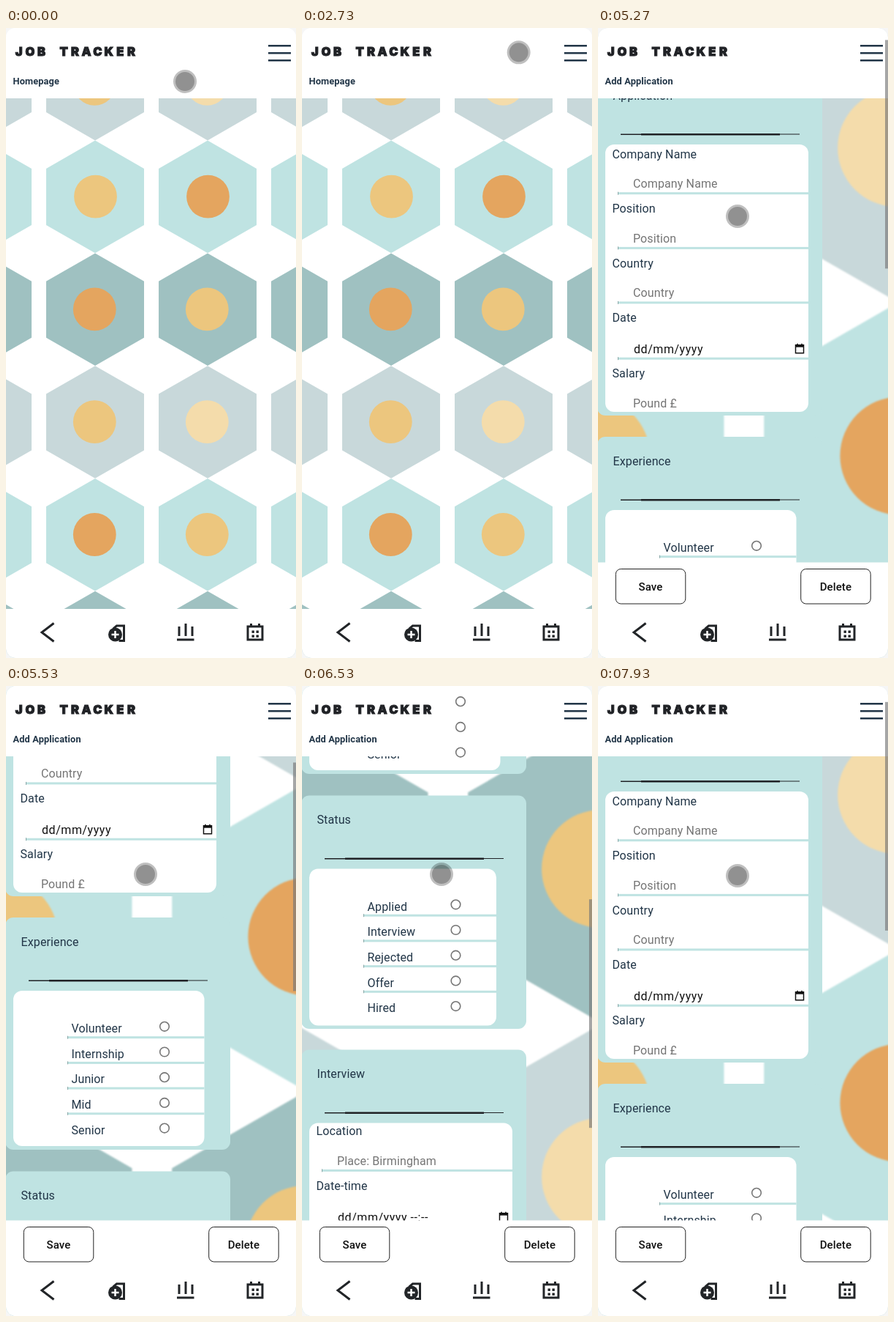
Recreate the animation shown at these times as an HTML page. Size 397 px wide and 860 px high, loop 8000 ms.

```html
<!DOCTYPE html>
<html lang="en">
<head>
<meta charset="utf-8">
<title>Job tracker</title>
<style>
  html, body { margin: 0; width: 100%; height: 100%; overflow: hidden; background: #f6f6f6; }
  svg { display: block; width: 397px; height: 860px; font: 16px Roboto, sans-serif; letter-spacing: .12px; fill: #213547; }
  .brand { font: 900 16.5px Inter, sans-serif; fill: #202226; stroke: #202226; stroke-width: 1; text-anchor: middle; letter-spacing: 0; }
  .crumb { font-size: 12.8px; font-weight: 600; }
  .item { font-weight: 500; fill: #212529; letter-spacing: .2px; }
  .hint { fill: #757575; }
  .date { fill: #111; letter-spacing: .55px; }
  .button { font-size: 15px; font-weight: 500; fill: #111; text-anchor: middle; }
  .line { fill: none; stroke: #213547; stroke-width: 2.5; }
  .icon { fill: none; stroke: #222528; stroke-width: 3; }
  .radio { fill: #fff; stroke: #767676; stroke-width: 1.6; }
</style>
</head>
<body>
<svg id="stage" viewBox="0 0 397 860"></svg>
<script>
const LIGHT = '#bfe3e2', DARK = '#9fc1c1', MIST = '#c8d8da';
const YELLOW = '#ecc67e', ORANGE = '#e4a55f', CREAM = '#f4dcab';
const TICK = 1000 / 15, LOOP = 120;

const rect = (x, y, w, h, fill, r = 0) =>
  `<rect x="${x}" y="${y}" width="${w}" height="${h}" rx="${r}" fill="${fill}"/>`;
const text = (x, mid, label, cls = '') =>
  `<text x="${x}" y="${mid + 5.7}" class="${cls}">${label}</text>`;
const path = (d, cls) => `<path d="${d}" class="${cls}"/>`;
const group = (id, body) => `<g id="${id}">${body}</g>`;
const rule = (x, y) => `<path d="M${x} ${y - .6}h28v-.4h190v.4h27v1.2h-27v.8h-190v-.4h-28z" fill="#202226"/>`;
const divider = (x, y, right) => rect(x, y - 1.5, right - x, 3, LIGHT) + rect(x, y - 2, 1, 4, '#86a5a5');

// Hexagon wallpaper
const rows = [
  [MIST, YELLOW, CREAM], [LIGHT, YELLOW, ORANGE], [DARK, ORANGE, YELLOW],
  [MIST, YELLOW, CREAM], [LIGHT, ORANGE, YELLOW], [DARK, YELLOW, ORANGE]
];
const wallpaper = rows.map(([hex, ...dots], i) => {
  const cy = 76.6 + i * 153.8;
  const cells = [-32, 122, 276, 430].map(cx =>
    `<path d="M${cx} ${cy - 76.8}l67 38.3v77l-67 38.3l-67-38.3v-77z" fill="${hex}"/>`).join('');
  const shift = i === 1 ? .5 : -.7;
  return cells + dots.map((c, j) =>
    `<circle cx="${122 + j * 154 + shift}" cy="${cy - .3}" r="29.4" fill="${c}"/>`).join('');
}).join('');

// Form cards, in page coordinates
const card = (top, height, title, boxRight, boxHeight) =>
  rect(-1, top, 308, height, LIGHT, 11) + text(20.5, top + 33, title) + rule(31, top + 86) +
  rect(10, top + 100, boxRight - 10, boxHeight, '#fff', 12);

const rowGap = 34.7;
const choices = (top, right, labels) => labels.map((label, i) =>
  text(89.5, top + 151.3 + i * rowGap, label) +
  (i < labels.length - 1 ? divider(84, top + 163.7 + i * rowGap, right) : '')).join('');
const radios = (top, x) => [0, 1, 2, 3, 4].map(i =>
  `<circle cx="${x}" cy="${top + 148.8 + i * rowGap}" r="6.3" class="radio"/>`).join('');

const calendarMark = y =>
  `<path d="M270.5 ${y - 5}h11v11h-11zM273 ${y - 7}v2M279 ${y - 7}v2" fill="none" stroke="#111" stroke-width="1.5"/>` +
  rect(270, y - 5.5, 12, 3.5, '#111');
const field = (top, label, hint, isDate, last) =>
  text(19.5, top, label) + text(isDate ? 49 : 48, top + (isDate ? 42.3 : 40.3), hint, isDate ? 'date' : 'hint') +
  (isDate ? calendarMark(top + 42) : '') + (last ? '' : divider(27, top + (isDate ? 55.5 : 53.7), 288));

const form =
  card(104, 470, 'Application', 288, 365) +
  field(217, 'Company Name', 'Company Name') +
  field(291.7, 'Position', 'Position') +
  field(366.2, 'Country', 'Country') +
  field(440.7, 'Date', 'dd/mm/yyyy', true) +
  field(516.7, 'Salary', 'Pound £', false, true) +
  card(603, 317, 'Experience', 271.5, 212) +
  choices(603, 271.5, ['Volunteer', 'Internship', 'Junior', 'Mid', 'Senior']) +
  card(949.5, 318.5, 'Status', 266, 214) +
  choices(949.5, 266, ['Applied', 'Interview', 'Rejected', 'Offer', 'Hired']) +
  card(1296.5, 470, 'Interview', 288, 365) +
  field(1407.7, 'Location', 'Place: Birmingham') +
  field(1482.7, 'Date-time', 'dd/mm/yyyy --:--', true);

const menuItems = [['Add application', 252.5], ['Recent application', 308.5], ['Calendar', 365.5], ['Statistics', 420.5], ['Archive', 477.5]];
const menu = rect(45, 96, 307.5, 595, LIGHT) + text(65.5, 129.5, 'Menu') + rule(76, 182) +
  rect(64.5, 229.5, 259, 355, '#fff', 12) +
  menuItems.map(([label, y], i) => text(120, y, label, 'item') + (i < 4 ? divider(120, y + 24, 323.5) : '')).join('');

const brandX = [...'JOB TRACKER'].map((_, i) => 17.6 + i * 15.4).join(' ');
const header = rect(0, 0, 397, 96, '#fff') +
  `<text x="${brandX}" y="37.7" class="brand">JOB TRACKER</text>` +
  group('homeCrumb', text(9.5, 71.3, 'Homepage', 'crumb')) +
  group('addCrumb', text(9.5, 71.3, 'Add Application', 'crumb')) +
  group('bars', path('M359 24.2h31M359 34.2h31M359 44.2h31', 'line')) +
  group('cross', path('M363.5 22.5l22.5 22.5M386 22.5l-22.5 22.5', 'line'));

const button = (x, label) =>
  `<rect x="${x}" y="738.5" width="95.5" height="47.5" rx="7" fill="#fff" stroke="#222"/>` +
  text(x + 47.7, 762.3, label, 'button');
const dots = [337.5, 343.5].map(x => [822.5, 828.5].map(y => rect(x - 1, y, 3.4, 3.4, '#222528')).join('')).join('');
const nav = rect(0, 793, 397, 67, '#fff') +
  path('M65.5 812.5L49 825l16.500 12.500', 'icon') +
  path('M147.500 822v-2.500l4-3.500h10v20.500h-7', 'icon') +
  '<circle cx="149.500" cy="828" r="9.5" fill="#222528"/>' +
  '<path d="M149.500 823v10M144.500 828h10" stroke="#fff" stroke-width="2.5"/>' +
  path('M237 817v13M246 813v17M255 817v13M234 835h23.500', 'icon') +
  path('M331 817h20v18h-20zM335.500 813v5M346.500 813v5', 'icon') + dots;

const stage = document.getElementById('stage');
stage.innerHTML =
  '<clipPath id="screen"><rect width="397" height="860" rx="13"/></clipPath><g clip-path="url(#screen)">' +
  rect(0, 0, 397, 860, '#fff') +
  group('paper', wallpaper) + group('form', form) + group('menu', menu) + header +
  group('radios', radios(603, 217) + radios(949.5, 210.5)) +
  group('actions', rect(0, 729.5, 397, 64, '#fff') + button(24.3, 'Save') + button(277.7, 'Delete')) + nav +
  group('thumb', '<rect x="393" width="4" height="312" fill="#777" opacity=".65"/>') + '</g>' +
  group('pointer', '<circle r="16" opacity=".25" fill="#000"/><circle r="13" opacity=".24" fill="#000"/>');

// Times in ticks of 1/15 s
const pointerPath = [
  [0, 245, 73], [2, 245, 73], [4, 222, 64], [6, 178, 46], [8, 160, 39], [20, 160, 39],
  [21, 172, 339], [24, 205, 650], [26, 220, 770], [27, 212, 781], [29, 165, 560], [31, 138, 230],
  [33, 133, 65], [34, 133, 65], [36, 103, 88], [39, 200, 60], [42, 345, 20], [44, 370, 33],
  [49, 370, 33], [51, 362, 50], [55, 255, 190], [59, 200, 258], [72, 200, 258], [74, 191, 257],
  [104, 191, 257], [106, 191, 258], [117, 191, 258], [119, 191, 259]
];
const scrollPath = [
  [78, 0], [79, 45], [80, 130], [81, 220], [82, 270], [83, 287], [87, 287], [88, 360], [89, 465],
  [90, 545], [91, 574], [95, 574], [96, 620], [97, 715], [98, 800], [99, 835], [101, 861],
  [104, 861], [105, 848], [106, 810], [108, 690], [110, 590], [111, 574], [112, 510], [113, 400],
  [114, 315], [115, 287], [117, 287], [118, 195], [119, 60]
];

function valueAt(table, tick, col = 1) {
  const next = table.findIndex(row => row[0] >= tick);
  if (next < 0) return table[table.length - 1][col];
  if (next === 0) return table[0][col];
  const a = table[next - 1], b = table[next];
  return a[col] + (b[col] - a[col]) * (tick - a[0]) / (b[0] - a[0]);
}

const part = {};
stage.querySelectorAll('g[id]').forEach(g => part[g.id] = g);
const show = (id, on) => part[id].style.display = on ? '' : 'none';
const place = (id, x, y) => part[id].setAttribute('transform', `translate(${x} ${y})`);

function draw(tick) {
  const adding = tick >= 66, menuOpen = tick >= 50 && !adding;
  const scroll = valueAt(scrollPath, tick);
  for (const id of ['form', 'radios', 'actions', 'addCrumb']) show(id, adding);
  show('homeCrumb', !adding);
  show('menu', menuOpen);
  show('cross', menuOpen);
  show('bars', !menuOpen);
  show('thumb', tick >= 79);
  part.paper.setAttribute('transform', adding ? `translate(198.5 ${-scroll}) scale(2.734) translate(-198.5 0)` : '');
  part.paper.style.filter = adding ? 'blur(.45px)' : '';
  place('form', 0, -scroll);
  place('radios', 0, -scroll);
  place('thumb', 0, scroll * .364);
  place('pointer', valueAt(pointerPath, tick), valueAt(pointerPath, tick, 2));
}

const start = performance.now();
function frame() {
  draw(Math.floor((performance.now() - start) / TICK + .06) % LOOP);
  requestAnimationFrame(frame);
}
frame();
</script>
</body>
</html>
```
